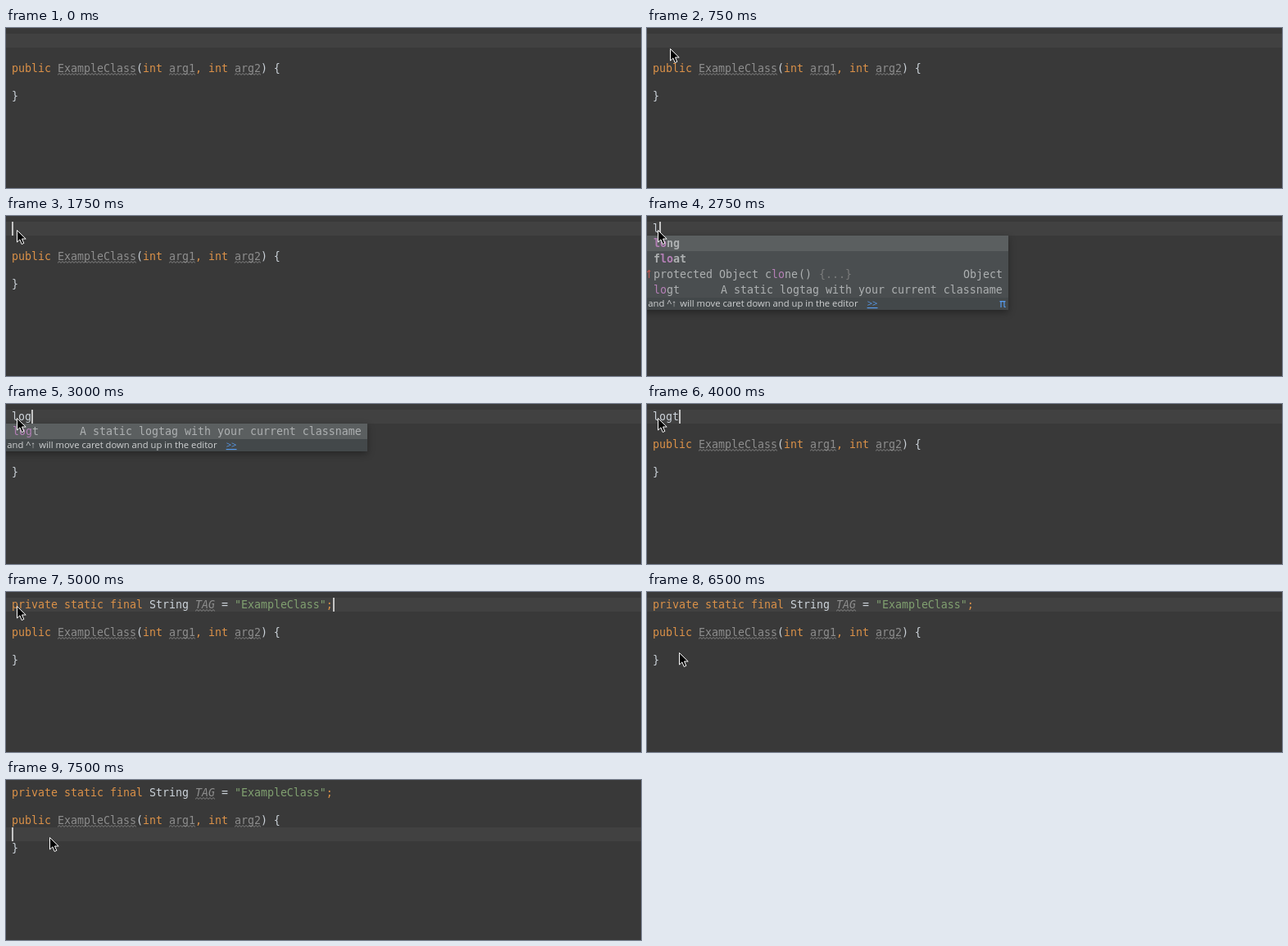
An HTML page for the animation above (8000 ms loop, 775 px wide and 196 px high).

```html
<!DOCTYPE html>
<html lang="en">
<head>
<meta charset="utf-8">
<title>Live template in a code editor</title>
<style>
  html, body { margin: 0; width: 100%; height: 100%; overflow: hidden; background: #393939; }
  svg { display: block; }

  text { white-space: pre; font: 13.29px "DejaVu Sans Mono", "Noto Sans Mono", monospace; fill: #ccd3da; }
  .key { fill: #db9148; }
  .unused { fill: #8d8d8d; }
  .string { fill: #80a070; }
  .popup text { fill: #adb0b1; }
  .popup .bold { font-weight: bold; }
  .popup .match { fill: #b47fb6; }
  .popup .body { fill: #7b7c7c; }
  text.hint { font: 11.25px "Open Sans", "Noto Sans", sans-serif; fill: #d0d2d3; text-anchor: end; }
  text.link { fill: #589df0; }
  .shadow { filter: drop-shadow(0 3px 4px rgba(0, 0, 0, .35)); }

  /* Every change is a hard step in one 8 s loop: 1% = 80 ms. */
  .step { animation: 8s step-end infinite; }
  .row { animation-name: row; }
  .caret { animation-name: caret; }
  .mouse { animation-name: mouse; }
  .type-l { animation-name: type-l; }
  .type-og { animation-name: type-og; }
  .type-t { animation-name: type-t; }
  .list { animation-name: list; }
  .single { animation-name: single; }
  .last { animation-name: last; }
  .field { animation-name: field; }
  .tag { animation-name: tag; }
  .tag-wave { animation-name: tag-wave; }
  .selection { animation-name: selection; }

  @keyframes row {
    0% { transform: none; }
    90.625%, 100% { transform: translateY(51px); }
  }
  @keyframes caret {
    0% { visibility: hidden; transform: translate(7px, 7px); }
    21.875% { visibility: visible; transform: translate(7px, 7px); }
    34.375% { visibility: visible; transform: translate(15px, 7px); }
    37.5% { visibility: visible; transform: translate(31px, 7px); }
    43.75% { visibility: visible; transform: translate(39px, 7px); }
    53.125% { visibility: visible; transform: translate(383px, 7px); }
    62.5% { visibility: visible; transform: translate(399px, 7px); }
    78.125% { visibility: hidden; transform: translate(399px, 7px); }
    84.375% { visibility: visible; transform: translate(399px, 7px); }
    90.625% { visibility: hidden; transform: translate(7px, 58px); }
    93.75%, 100% { visibility: visible; transform: translate(7px, 58px); }
  }
  @keyframes mouse {
    0% { visibility: hidden; transform: translate(43px, 47px); }
    6.25% { visibility: visible; transform: translate(43px, 47px); }
    9.375% { visibility: visible; transform: translate(28px, 24px); }
    12.5% { visibility: visible; transform: translate(13px, 16px); }
    78.125% { visibility: hidden; transform: translate(39px, 73px); }
    81.25% { visibility: visible; transform: translate(39px, 73px); }
    84.375%, 100% { visibility: visible; transform: translate(53px, 69px); }
  }
  @keyframes type-l {
    0%, 53.125%, 100% { visibility: hidden; }
    34.375% { visibility: visible; }
  }
  @keyframes type-og {
    0%, 53.125%, 100% { visibility: hidden; }
    37.5% { visibility: visible; }
  }
  @keyframes type-t {
    0%, 53.125%, 100% { visibility: hidden; }
    43.75% { visibility: visible; }
  }
  @keyframes list {
    0%, 37.5%, 100% { visibility: hidden; }
    34.375% { visibility: visible; }
  }
  @keyframes single {
    0%, 50%, 100% { visibility: hidden; }
    37.5% { visibility: visible; }
  }
  @keyframes last {
    0% { fill: #adb0b1; }
    43.75%, 100% { fill: #b47fb6; }
  }
  @keyframes field {
    0% { visibility: hidden; }
    53.125%, 100% { visibility: visible; }
  }
  @keyframes tag {
    0% { fill: #ccd3da; font-style: normal; }
    56.25%, 100% { fill: #8d8d8d; font-style: italic; }
  }
  @keyframes tag-wave {
    0% { visibility: hidden; }
    56.25%, 100% { visibility: visible; }
  }
  @keyframes selection {
    0%, 62.5%, 100% { visibility: hidden; }
    53.125% { visibility: visible; }
  }
</style>
</head>
<body>
<svg width="775" height="196" viewBox="0 0 775 196">
  <defs>
    <pattern id="wave" width="4" height="3" patternUnits="userSpaceOnUse" patternTransform="translate(3 55)">
      <path d="M-1 1.5 L0 2.5 L2 .5 L4 2.5 L5 1.5" fill="none" stroke="#909090" stroke-width=".9"/>
    </pattern>
    <pattern id="tag-wave" href="#wave" patternTransform="translate(3 21)"/>
    <g id="hint">
      <text class="hint" x="36" y="111">and ^↑</text>
      <text class="hint" x="257.5" y="111">will move caret down and up in the editor</text>
      <text class="hint link" x="281.5" y="111" text-decoration="underline">&gt;&gt;</text>
    </g>
  </defs>

  <rect width="775" height="196" fill="#393939"/>
  <rect class="step row" y="7" width="775" height="17" fill="#414141"/>
  <rect class="step selection" x="287" y="7" width="96" height="17" fill="#2f4d83"/>

  <text x="7" y="20"><tspan class="step type-l">l</tspan><tspan class="step type-og">og</tspan><tspan class="step type-t">t</tspan></text>
  <text class="step field" x="7" y="20"><tspan class="key">private static final </tspan>String <tspan class="step tag">TAG</tspan> = <tspan class="string">"ExampleClass"</tspan><tspan class="key">;</tspan></text>
  <rect class="step tag-wave" x="231" y="21" width="24" height="3" fill="url(#tag-wave)"/>

  <text x="7" y="54"><tspan class="key">public </tspan><tspan class="unused">ExampleClass</tspan>(<tspan class="key">int </tspan><tspan class="unused">arg1</tspan><tspan class="key">, int </tspan><tspan class="unused">arg2</tspan>) {</text>
  <path d="M63 55h96v3h-96zM199 55h32v3h-32zM279 55h32v3h-32z" fill="url(#wave)"/>
  <text x="7" y="88">}</text>

  <g class="popup step list">
    <rect class="shadow" x="-20" y="24" width="461" height="91" fill="#4a4e50"/>
    <rect y="24" width="441" height="19" fill="#5b5f60"/>
    <rect y="100" width="441" height="15" fill="#43484a"/>
    <text class="bold" x="8" y="38"><tspan class="match">lo</tspan>ng</text>
    <text class="bold" x="8" y="57">f<tspan class="match">lo</tspan>at</text>
    <path d="M2.5 76V66.5M0 69L2.5 66.5L4 68" fill="none" stroke="#b9564f" stroke-width="1.2"/>
    <text x="8" y="76">protected Object c<tspan class="match">lo</tspan>ne<tspan dx="1">()</tspan> <tspan class="body" dx="1">{...}</tspan></text>
    <text x="386" y="76">Object</text>
    <text x="8" y="95"><tspan class="match">lo</tspan>gt</text>
    <text x="90" y="95">A static logtag with your current classname</text>
    <use href="#hint"/>
    <text class="link" x="430" y="112">π</text>
  </g>

  <g class="popup step single">
    <rect class="shadow" x="-20" y="24" width="461" height="34" fill="#43484a"/>
    <rect y="24" width="441" height="19" fill="#5b5f60"/>
    <text x="8" y="38"><tspan class="match">log</tspan><tspan class="step last">t</tspan></text>
    <text x="90" y="38">A static logtag with your current classname</text>
    <use href="#hint" y="-57"/>
  </g>

  <rect class="step caret" width="2" height="17" fill="#c4c4c4"/>
  <path class="step mouse" d="M.5 1.5V16L3.9 12.9L6.2 18.5L8.8 17.4L6.5 12H11.2Z" fill="#000" stroke="#fff" stroke-linejoin="round"/>
</svg>
</body>
</html>
```
